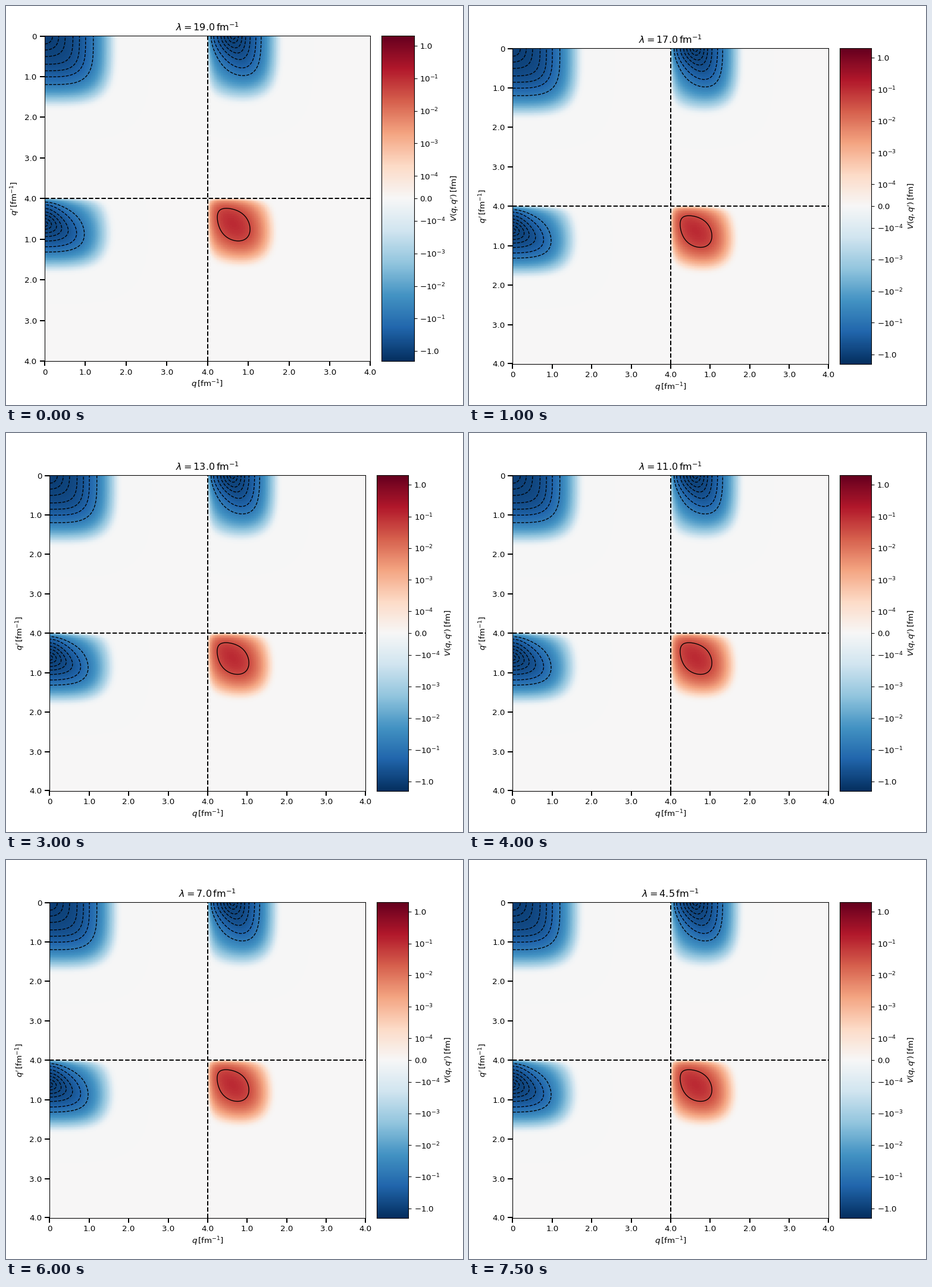
A matplotlib script for the animation above (8000 ms loop, 768 by 672 pixels).

```python
import numpy as np
import matplotlib.pyplot as plt
from matplotlib.animation import FuncAnimation

W, H, DPI = 768, 672, 96
plt.rcParams.update({"font.family": "DejaVu Sans", "font.size": 10,
                     "mathtext.fontset": "dejavusans"})

LAMBDAS = [19.0 - i for i in range(15)] + [4.5]
LIN, VMAX = 1e-4, 2.0
LIN_SPAN = 1 / (1 - 1 / np.e)


def symlog(v):
    """Map a potential value to [-1, 1], linear below LIN and logarithmic above."""
    def stretch(a):
        return np.where(a < LIN, a / LIN * LIN_SPAN,
                        LIN_SPAN + np.log(np.maximum(a, LIN) / LIN))
    return np.sign(v) * stretch(np.abs(v)) / stretch(VMAX)


def yukawa(l, q, p, m2):
    """Legendre projection of the pion propagator."""
    total = 0.0
    for z, w in zip(*np.polynomial.legendre.leggauss(40)):
        pl = (1.0, z, 1.5 * z * z - 0.5)[l]
        total = total + 0.5 * w * pl / (q * q + p * p - 2 * q * p * z + m2)
    return total


def cutoff(q, p):
    return np.exp(-(q**4 + p**4) / 1.02)


def v_ss(q, p):
    return -0.7 * (0.49 * yukawa(0, q, p, 0.49) + 0.52) * cutoff(q, p)


def v_sd(d, s, m2=0.17):
    t = (d * d * yukawa(0, d, s, m2) + s * s * yukawa(2, d, s, m2)
         - 2 * d * s * yukawa(1, d, s, m2))
    return -1.5 * t * cutoff(d, s)


def v_dd(q, p, m2=0.25):
    t = (2 * q * p * yukawa(1, q, p, m2)
         - (q * q + p * p) * yukawa(2, q, p, m2))
    return 0.75 * t * cutoff(q, p)


# Momentum mesh: columns are q, rows are q'
k = (np.arange(200) + 0.5) * 0.02
Q, P = np.meshgrid(k, k)
ss, sd, dd = v_ss(Q, P), v_sd(Q, P), v_dd(Q, P)

# Contour levels given by where they cross the q axis
ss_levels = sorted(v_ss(q, 0.0) for q in (0.2, 0.35, 0.51, 0.7, 0.86, 1.01, 1.2))
sd_levels = sorted(v_sd(q, 0.0) for q in (0.69, 0.76, 0.85, 0.94, 1.05, 1.19, 1.32))

fig = plt.figure(figsize=(W / DPI, H / DPI), dpi=DPI, facecolor="white")
ax = fig.add_axes([0.1, 0.1, 0.7, 0.8])
cax = fig.add_axes([0.81, 0.1, 0.07, 0.8])

ax.imshow(symlog(np.block([[ss, sd], [sd.T, dd]])), cmap="RdBu_r", vmin=-1, vmax=1,
          extent=(0, 8, 8, 0), aspect="auto", interpolation="nearest")
for values, levels, x0, y0 in ((ss, ss_levels, 0, 0), (sd, sd_levels, 4, 0),
                               (sd.T, sd_levels, 0, 4), (dd, [0.039], 4, 4)):
    ax.contour(k + x0, k + y0, values, levels=levels, colors="k", linewidths=1)
MID = 4.005
ax.axhline(MID, color="k", ls="--", lw=1.5)
ax.axvline(MID, color="k", ls="--", lw=1.5)
ax.set(xlim=(0, 8), ylim=(8, 0))

ticks = np.minimum(np.arange(9) + 0.005, 7.995)
names = ["0"] + [f"{(i - 1) % 4 + 1:.1f}" for i in range(1, 9)]
ax.set_xticks(ticks, names)
ax.set_yticks(ticks, names)
ax.tick_params(length=6, width=1.5)
title = ax.set_title("", fontsize=12, pad=6)

cax.imshow(np.linspace(1, -1, 512)[:, None], cmap="RdBu_r", vmin=-1, vmax=1,
           extent=(0, 1, -1, 1), aspect="auto")
exps = range(-4, 0)
marks = ([(-1, "$-1.0$"), (0, "0.0"), (1, "1.0")]
         + [(10.0**e, f"$10^{{{e}}}$") for e in exps]
         + [(-10.0**e, f"$-10^{{{e}}}$") for e in exps])
cax.set_xticks([])
cax.set_yticks([float(symlog(v)) for v, _ in marks], [s for _, s in marks])
cax.yaxis.tick_right()

center = dict(ha="center", va="center")
xlabel = fig.text(0, 0, r"$q\,[\mathrm{fm}^{-1}]$", **center)
ylabel = fig.text(0, 0, r"$q'\,[\mathrm{fm}^{-1}]$", rotation=90, **center)
clabel = fig.text(0, 0, r"$V(q,q')\,[\mathrm{fm}]$", rotation=90, **center)


def place(axes, left, top, width, height):
    axes.set_position([left / W, 1 - (top + height) / H, width / W, height / H])


def put(label, x, y):
    label.set_position((x / W, 1 - y / H))


def layout(left, top, size):
    """Square map with a colour bar a tenth as wide beside it."""
    bar, bar_width = left + size + 19, size / 10
    place(ax, left, top, size, size)
    place(cax, bar, top, bar_width, size)
    mid = top + size / 2
    put(xlabel, left + size / 2, top + size + 39.5)
    put(ylabel, left - 49, mid)
    put(clabel, bar + bar_width + 68, mid)


# The layout settles over the first three steps
LAYOUTS = [(64.6, 50.2, 547.7), (73.0, 60.3, 531.3), (73.0, 71.3, 531.3)]


def update(i):
    layout(*LAYOUTS[min(i, 2)])
    title.set_text(rf"$\lambda = {LAMBDAS[i]:.1f}\,\mathrm{{fm}}^{{-1}}$")
    return []


anim = FuncAnimation(fig, update, frames=len(LAMBDAS), interval=500,
                     repeat=True, repeat_delay=0, blit=False)
plt.show()
```
